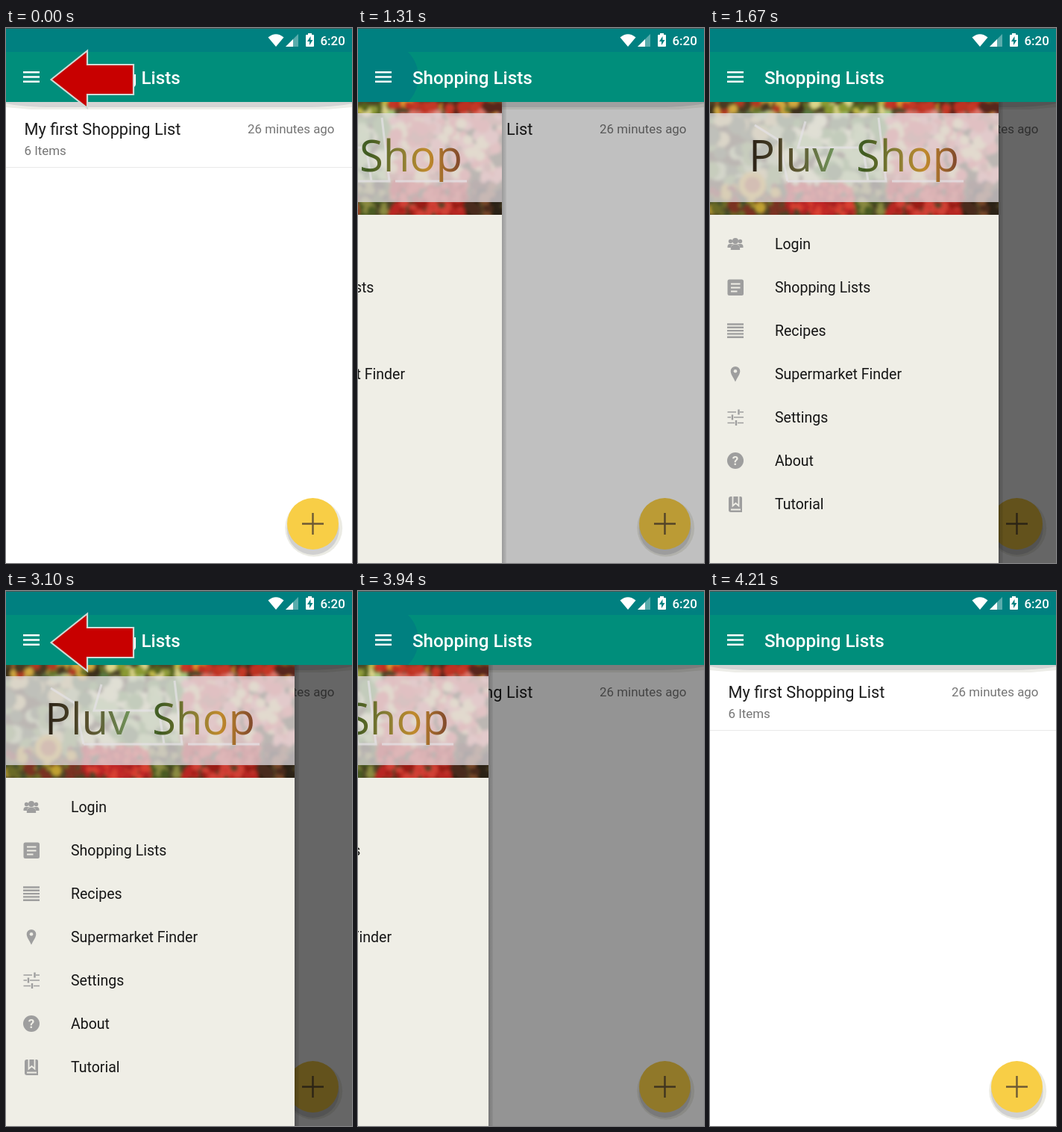
An HTML page for the animation above (4.37 s loop, 464x716 px).

```html
<!DOCTYPE html>
<html lang="en">
<head>
<meta charset="utf-8">
<title>Shopping list drawer</title>
<style>
  html, body { margin: 0; width: 100%; height: 100%; overflow: hidden; background: #fff; }
  svg { display: block; width: 100vw; height: 100vh; }
  text { font-family: Roboto, sans-serif; }
  .brand { font: 58px "Open Sans", sans-serif; }
  .small { font-size: 16.9px; fill: #757575; }
  .item { font-size: 19.5px; fill: #161616; }
  .icons { fill: #9e9e9e; }
  .line { fill: none; stroke: #9e9e9e; stroke-width: 2.4; }
  .thin { stroke-width: 1.7; }
  .paper { fill: #efeee6; }
</style>
</head>
<body>
<svg viewBox="0 0 464 716" preserveAspectRatio="none">
  <defs>
    <linearGradient id="edge">
      <stop offset="0" stop-color="#000" stop-opacity=".2"/>
      <stop offset="1" stop-color="#000" stop-opacity=".05"/>
    </linearGradient>
    <linearGradient id="ink" gradientUnits="userSpaceOnUse" x1="54" x2="332" y1="0" y2="0">
      <stop offset="0" stop-color="#2a2116"/>
      <stop offset=".22" stop-color="#5c5530"/>
      <stop offset=".4" stop-color="#6f9158"/>
      <stop offset=".55" stop-color="#3f5a20"/>
      <stop offset=".7" stop-color="#857c34"/>
      <stop offset=".84" stop-color="#c08a2c"/>
      <stop offset="1" stop-color="#80482c"/>
    </linearGradient>
    <filter id="soft"><feGaussianBlur stdDeviation="2"/></filter>
    <clipPath id="banner"><path d="M0 99H387V250H0Z"/></clipPath>
    <clipPath id="bar"><path d="M0 32H464V99H0Z"/></clipPath>
  </defs>

  <g id="page">
    <path fill="#fff" d="M0 0H464V716H0Z"/>
    <path fill="#ededE8" d="M0 99H464V106L430 109H34L0 106Z"/>
    <path fill="#d4d4d4" d="M0 99H464V101Q440 106 400 106H64Q24 106 0 101Z"/>
    <text x="24.5" y="143" font-size="21.75" fill="#1c1c1c">My first Shopping List</text>
    <text class="small" x="440.5" y="141" text-anchor="end">26 minutes ago</text>
    <text class="small" x="24.5" y="170">6 Items</text>
    <path id="rule" fill="#e9e9e9" d="M0 186H464V187H0Z"/>
    <circle cx="412.7" cy="669" r="38.5" fill="#ebebe4"/>
    <circle cx="411.7" cy="670" r="35" fill="#d0d0d0"/>
    <circle cx="411.5" cy="663.5" r="34.5" fill="#f8ce46"/>
    <path d="M397 663.5H426M411.5 649V678" stroke="#6d5a35" stroke-width="2.4"/>
  </g>

  <path id="scrim" d="M0 99H464V716H0Z"/>

  <g id="drawer">
    <path fill="url(#edge)" d="M387 99H393V716H387Z"/>
    <path class="paper" d="M0 99H387V716H0Z"/>
    <g clip-path="url(#banner)">
      <path fill="#4c4426" d="M0 99H387V250H0Z"/>
      <g id="produce" filter="url(#soft)"></g>
      <path fill="none" stroke="#eee" stroke-width="3" opacity=".7"
        d="M60 130L92 150 104 205M104 205H236L226 120M128 125L118 160H205L212 205M244 205H340"/>
      <path fill="#e3dfe4" opacity=".74" d="M0 114H387V233H0Z"/>
      <g fill="url(#ink)">
        <text class="brand" x="52" y="192">Pluv</text>
        <text class="brand" x="196" y="192">Shop</text>
      </g>
    </g>
    <g id="menu"></g>
    <g class="icons">
      <g>
        <circle cx="27.5" cy="285.5" r="2.7"/><circle cx="40.5" cy="285.5" r="2.7"/>
        <path d="M23.5 294Q23 289 27 289H41Q45 289 44.5 294Z"/>
        <path class="paper" d="M28 298Q27 291 31 289.5H37Q41 291 40 298Z"/>
        <circle cx="34" cy="285" r="4"/>
        <path d="M27.8 297Q27.5 290 32 290H36Q40.5 290 40.2 297Z"/>
      </g>
      <rect x="23.5" y="336.5" width="21.5" height="21.5" rx="2.5"/>
      <path class="paper" d="M28 341.5H40.5V343.5H28ZM28 346.5H40.5V348.5H28ZM28 351.5H36.5V353.5H28Z"/>
      <path class="line" d="M23 396.5H45M23 400.8H45M23 405.1H45M23 409.4H45M23 413.7H45"/>
      <path d="M34 473.5C31 467 27.7 463.5 27.7 459.3A6.3 6.3 0 0 1 40.3 459.3C40.3 463.5 37 467 34 473.5Z"/>
      <circle class="paper" cx="34" cy="459.3" r="2.3"/>
      <path class="line thin" d="M23.5 514H35M40 514H45M23.5 521H28M32 521H45M23.5 528.5H33M37 528.5H45"/>
      <path class="line" d="M38.5 510.5V517.5M30 517.5V524.5M35 525V532"/>
      <circle cx="34" cy="579" r="11"/>
      <text class="paper" x="34" y="585" font-size="17" font-weight="700" text-anchor="middle">?</text>
      <path d="M28 627H41Q43 627 43 629V648H28Q25 648 25 645V630Q25 627 28 627Z"/>
      <path fill="none" stroke="#efeee6" stroke-width="1.8" d="M30.5 627V639.5L34.5 636 38.5 639.5V627M28 644.5H41"/>
    </g>
  </g>

  <g id="toolbar">
    <path fill="#008e7b" d="M0 32H464V99H0Z"/>
    <g clip-path="url(#bar)"><circle id="ripple" cx="34" cy="65.5" fill="#008080"/></g>
    <path fill="#008080" d="M0 0H464V32H0Z"/>
    <path fill="#4a5656" d="M0 0H464V1H0Z"/>
    <path stroke="#fff" stroke-width="2.4" d="M23 59.3H45M23 65.5H45M23 71.7H45"/>
    <text x="73" y="75" font-size="24.2" font-weight="500" fill="#fff">Shopping Lists</text>
    <g fill="#fff">
      <path d="M351.5 12.5Q362 4 372.5 12.5L362 25Z"/>
      <path opacity=".35" d="M375 25H392V8Z"/>
      <path d="M375 25H385V15Z"/>
      <path d="M405 7H410V9H412Q413 9 413 10V24Q413 25 412 25H403Q402 25 402 24V10Q402 9 403 9H405Z"/>
      <path fill="#008080" d="M408.5 11L404 18H407V23L411.5 16H408.5Z"/>
      <text x="421.5" y="23" font-size="16.9" font-weight="500">6:20</text>
    </g>
  </g>

  <path id="arrow" fill="#c80000" stroke="#d0dad5" stroke-width="2.2"
    d="M60.5 69L109 30.5V49H171V89H109V107Z"/>
</svg>
<script>
const LOOP = 4370, FRAME = 30, SETTLE = 512;
const OPEN_TAP = 1190, CLOSE_TAP = 3760, SECOND_ARROW = 3100, CLOSED = 4210;
const WIDTH = 387, SHADOW = 6;
const $ = id => document.getElementById(id);
const clamp = v => Math.min(1, Math.max(0, v));

function add(parent, tag, attrs, text = "") {
  const el = document.createElementNS("http://www.w3.org/2000/svg", tag);
  for (const key in attrs) el.setAttribute(key, attrs[key]);
  el.textContent = text;
  parent.append(el);
}

["Login", "Shopping Lists", "Recipes", "Supermarket Finder", "Settings", "About", "Tutorial"]
  .forEach((label, i) => add($("menu"), "text", { class: "item", x: 87, y: 296 + 58 * i }, label));

// Crates of produce: x, y, width, height, radius, colours
const crates = [
  [0, 112, 100, 100, 12, "#7a9a50 #a8bc80 #5a6a40 #c4bc78"],
  [100, 112, 140, 95, 12, "#6b9848 #a8c87f #58783f #d8e0a8"],
  [240, 112, 148, 95, 9, "#d86a60 #e09084 #b8705c #e0cc90 #dc7468"],
  [0, 99, 130, 13, 7, "#3a2e1a #b03a20 #d0a840 #66752a #4a3a20"],
  [130, 99, 110, 13, 7, "#c4bc48 #8a9a30 #dcd48a #56661f"],
  [240, 99, 148, 13, 8, "#bd3020 #dc9630 #58281a #c43828"],
  [0, 212, 100, 38, 7, "#6a6a28 #c0a030 #7a3020 #45502a"],
  [104, 208, 91, 42, 5, "#c02828 #d84030 #a82020"],
  [195, 208, 42, 42, 6, "#4a5a20 #8a8a40 #38301c"],
  [240, 208, 98, 42, 6, "#b82820 #d04034 #981c18"],
  [340, 208, 48, 42, 8, "#4a2a1a #7a4a2a #2a2018"]
];
let seed = 11;
const rand = () => (seed = seed * 16807 % 2147483647) / 2147483647;
for (const [x, y, w, h, r, list] of crates) {
  const colours = list.split(" ");
  for (let n = w * h / (r * r * 0.9); n > 0; n--) {
    add($("produce"), "circle", {
      cx: x + rand() * w, cy: y + rand() * h, r: r * (0.6 + rand() * 0.5),
      fill: colours[Math.floor(rand() * colours.length)]
    });
  }
}
add($("produce"), "circle", { cx: 57, cy: 210, r: 18, fill: "#c8a838" });
add($("produce"), "circle", { cx: 57, cy: 210, r: 11, fill: "#a8602c" });

// The screen refreshes in fixed ticks after each tap
function tick(t) {
  const tap = t < CLOSE_TAP ? OPEN_TAP : CLOSE_TAP;
  return tap + Math.floor((t - tap) / FRAME) * FRAME;
}

const settle = (t, start) => 1 - (1 - clamp((t - start) / SETTLE)) ** 5;
const openness = (t, start, end) => t >= CLOSED ? 0 : settle(t, start) - settle(t, end);

function render(now) {
  const real = now % LOOP, t = tick(real);
  const open = openness(t, 1244, 3865);
  const x = open ? Math.round(WIDTH * open) - WIDTH : -WIDTH - SHADOW;
  $("drawer").setAttribute("transform", `translate(${x})`);
  $("scrim").setAttribute("opacity", 0.6 * openness(t, 1258, 3905));
  $("rule").setAttribute("opacity", clamp(1 - 3 * open));

  const age = t - (t < CLOSE_TAP ? OPEN_TAP : CLOSE_TAP);
  $("ripple").setAttribute("r", 47 * clamp(0.4 + age / 200));
  $("ripple").setAttribute("opacity", age < 0 ? 0 : 1 - clamp((age - 190) / 210));

  const pointing = real < OPEN_TAP || (real >= SECOND_ARROW && real < CLOSE_TAP);
  $("arrow").setAttribute("visibility", pointing ? "visible" : "hidden");
  requestAnimationFrame(() => render(performance.now()));
}
render(performance.now());
</script>
</body>
</html>
```
